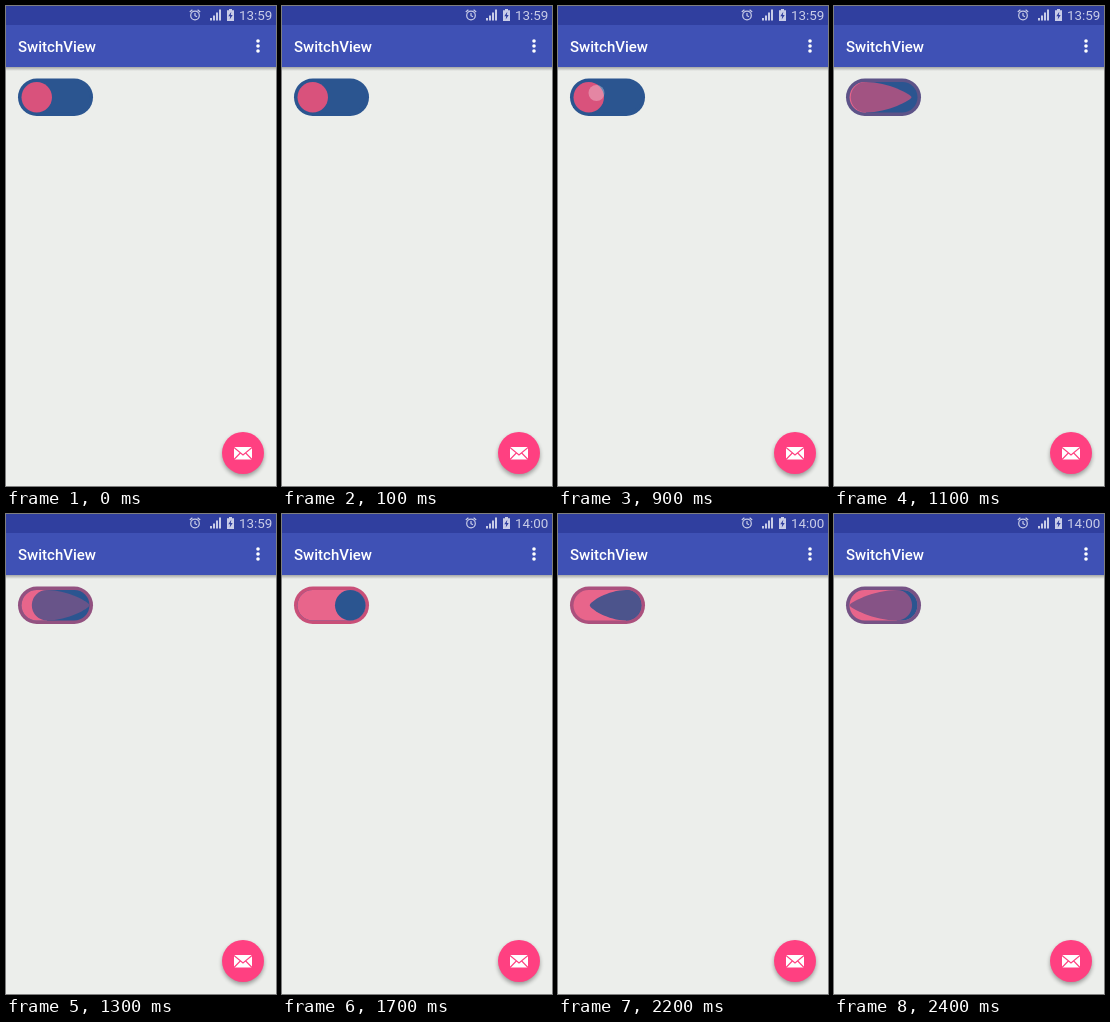
An HTML page for the animation above (2500 ms loop, 270x480 px).

```html
<!DOCTYPE html>
<html lang="en">
<head>
<meta charset="utf-8">
<title>SwitchView</title>
<style>
  html, body { margin: 0; width: 100%; height: 100%; overflow: hidden; background: #eceeeb; }
  svg { display: block; width: 100vw; height: 100vh; }
  text { font-family: Roboto, sans-serif; }
</style>
</head>
<body>
<svg viewBox="0 0 270 480" preserveAspectRatio="none">
  <defs>
    <linearGradient id="shade" x2="0" y2="1">
      <stop stop-color="#000" stop-opacity=".3"/>
      <stop offset="1" stop-color="#000" stop-opacity="0"/>
    </linearGradient>
    <filter id="blur" x="-30%" y="-30%" width="160%" height="160%">
      <feGaussianBlur stdDeviation="2"/>
    </filter>
    <clipPath id="passed"><rect id="split" y="70" height="45"/></clipPath>
  </defs>

  <rect width="270" height="480" fill="#eceeeb"/>
  <rect y="61" width="270" height="4" fill="url(#shade)"/>
  <rect width="270" height="61" fill="#3f51b5"/>
  <rect width="270" height="19" fill="#303f9f"/>

  <g fill="#c9cde8">
    <g fill="none" stroke="#c9cde8" stroke-width="1.2">
      <circle cx="189" cy="9.5" r="4.3"/>
      <path d="M189 7V9.7L191 10.8M183.8 6L186.4 3.7M194.2 6L191.6 3.7"/>
    </g>
    <path d="M204 12h2v2.5h-2zM207 9.5h2v5h-2zM210 6.5h2v8h-2zM213 3.5h2v11h-2z"/>
    <path d="M223 3h3v1.3h2V15h-7V4.300h2z"/>
    <path d="M225.300 5.800L222.300 10.200H224.200L223.700 13.500L226.700 9H224.800z" fill="#303f9f"/>
    <text id="clock" x="266.300" y="14.300" font-size="13.400" text-anchor="end">13:59</text>
  </g>

  <text x="12" y="45.500" font-size="15" font-weight="500" fill="#fff">SwitchView</text>
  <g fill="#fff">
    <circle cx="252" cy="35" r="1.800"/>
    <circle cx="252" cy="40" r="1.800"/>
    <circle cx="252" cy="45" r="1.800"/>
  </g>

  <rect id="rim" x="12" y="72.500" width="75" height="37.500" rx="18.750"/>
  <rect id="before" x="15.500" y="76" width="68" height="30.500" rx="15.250"/>
  <rect id="after" x="15.500" y="76" width="68" height="30.500" rx="15.250" clip-path="url(#passed)"/>
  <path id="knob"/>
  <circle id="touch" cx="38.500" cy="87" r="8" fill="#fff" opacity=".3"/>

  <circle cx="237" cy="449.500" r="21" opacity=".35" filter="url(#blur)"/>
  <circle cx="237" cy="447" r="21" fill="#ff4081"/>
  <rect x="228" y="441" width="18" height="12.500" rx=".8" fill="#fff"/>
  <path d="M228 441.500L237 449L246 441.500M228 453.500L234.300 447M246 453.500L239.700 447" fill="none" stroke="#ff4081" stroke-width="1.100"/>
</svg>
<script>
const LOOP = 2500, STEP = 100, MORPH = 600;
const TURN_ON = 910, TURN_OFF = 2085;
const R = 15.25, MID = 91.25, LEFT = 30.75, TRAVEL = 37.5;
const BLUE = [43, 85, 144], PINK = [217, 82, 124];
const TRACK = [232, 101, 139], RIM = [201, 79, 120];

const el = id => document.getElementById(id);
const clamp = v => Math.min(1, Math.max(0, v));
const mix = (a, b, p) => `rgb(${a.map((v, i) => Math.round(v + (b[i] - v) * p))})`;

// Round tail at x, tapered nose reaching out by len in direction dir.
function drop(x, len, dir) {
  const thin = R / len;
  const k = x + dir * len * (0.45 + 0.1 * thin);
  const nose = x + dir * len;
  const h = R * 0.55 * thin;
  const top = MID - R, bottom = MID + R;
  return `M${x} ${top}C${k} ${top} ${nose} ${MID - h} ${nose} ${MID}` +
    `C${nose} ${MID + h} ${k} ${bottom} ${x} ${bottom}` +
    `A${R} ${R} 0 0 ${dir > 0 ? 1 : 0} ${x} ${top}Z`;
}

function drawSwitch(p, toOn) {
  const dir = toOn ? 1 : -1;
  const start = toOn ? LEFT : LEFT + TRAVEL;
  const tail = start + dir * TRAVEL * p ** 3;
  const nose = start + dir * (TRAVEL * Math.sin(Math.PI * Math.min(p, 0.5)) + R);
  const on = toOn ? p : 1 - p;

  el('knob').setAttribute('d', drop(tail, Math.abs(nose - tail), dir));
  el('knob').setAttribute('fill', mix(PINK, BLUE, on));
  el('rim').setAttribute('fill', mix(BLUE, RIM, on));
  el('before').setAttribute('fill', mix(BLUE, TRACK, toOn ? 0 : 1));
  el('after').setAttribute('fill', mix(BLUE, TRACK, toOn ? 1 : 0));

  // The new track colour shows behind the tail; at the ends it is all or nothing.
  const from = p === 1 || toOn ? 0 : tail;
  const to = p === 1 || !toOn ? 270 : tail;
  el('split').setAttribute('x', from);
  el('split').setAttribute('width', p === 0 ? 0 : to - from);
}

function frame(now) {
  const t = Math.floor(now % LOOP / STEP) * STEP;
  const toOn = t < TURN_OFF;
  drawSwitch(clamp((t - (toOn ? TURN_ON : TURN_OFF)) / MORPH), toOn);
  el('touch').style.display = t >= 700 && t < TURN_ON ? '' : 'none';
  el('clock').textContent = t < 1500 ? '13:59' : '14:00';
}

const begin = performance.now();
function tick() {
  frame(performance.now() - begin);
  requestAnimationFrame(tick);
}
tick();
</script>
</body>
</html>
```
